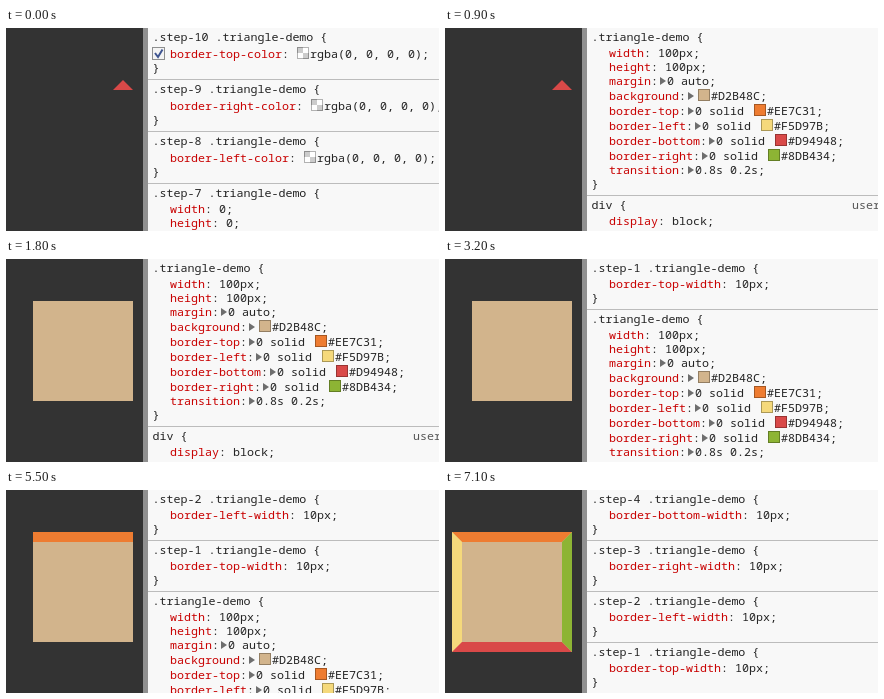
Write an HTML page that moves like this. It is 433x203 px and loops after 8 s.

```html
<!DOCTYPE html>
<html lang="en">
<head>
<meta charset="utf-8">
<title>CSS triangle demo</title>
<style>
  html, body { margin: 0; width: 100%; height: 100%; overflow: hidden; background: #333; }
  svg { display: block; width: 433px; height: 203px; overflow: hidden; }
  text { font: 11.667px "Noto Sans Mono", "DejaVu Sans Mono", monospace; fill: #222; white-space: pre; }
  .name { fill: #c80000; }
  .origin { fill: #555; }
</style>
</head>
<body>
<svg id="stage" viewBox="0 0 433 203">
  <rect width="137" height="203" fill="#333"/>
  <g id="box"></g>
  <rect x="137" width="5" height="203" fill="#909090"/>
  <rect x="142" width="291" height="203" fill="#f8f8f8"/>
</svg>
<script>
const LOOP = 8000, STEP = 100, CHAR = 7, ROW = 14;
const SELECTOR_X = 146.5, PROPERTY_X = 164;
const stage = document.getElementById('stage');

function add(parent, tag, attrs, content) {
  const node = document.createElementNS('http://www.w3.org/2000/svg', tag);
  for (const key in attrs) node.setAttribute(key, attrs[key]);
  if (content) node.textContent = content;
  parent.appendChild(node);
  return node;
}

// Style rules shown in the inspector
const COLORS = { top: '#EE7C31', left: '#F5D97B', bottom: '#D94948', right: '#8DB434' };
const stepRule = (n, ...props) => ({ selector: `.step-${n} .triangle-demo`, props });
const clearSide = (n, side) => stepRule(n, [`border-${side}-color`, 'rgba(0, 0, 0, 0)']);
const growSide = (n, side) => stepRule(n, [`border-${side}-width`, '10px']);

const base = {
  selector: '.triangle-demo',
  props: [
    ['width', '100px'], ['height', '100px'], ['margin', '0 auto'], ['background', '#D2B48C'],
    ...Object.entries(COLORS).map(([side, color]) => [`border-${side}`, `0 solid ${color}`]),
    ['transition', '0.8s 0.2s']
  ]
};
const division = { selector: 'div', origin: 'user agent stylesheet', props: [['display', 'block']] };
const step1 = growSide(1, 'top'), step2 = growSide(2, 'left');
const step3 = growSide(3, 'right'), step4 = growSide(4, 'bottom');

const panels = [
  [0, [clearSide(10, 'top'), clearSide(9, 'right'), clearSide(8, 'left'),
       stepRule(7, ['width', '0'], ['height', '0'])]],
  [900, [base, division]],
  [3200, [step1, base]],
  [5500, [step2, step1, base]],
  [6000, [step3, step2, step1, base]],
  [6400, [step4, step3, step2, step1]]
].map(([start, rules]) => ({ start, node: drawPanel(rules) }));

function drawSwatch(g, x, y, color) {
  const clear = color.startsWith('rgba');
  add(g, 'rect', { x, y, width: 12, height: 12, fill: clear ? '#fff' : color });
  if (clear) add(g, 'path', { d: `M${x} ${y}h6v12h6v-6h-12z`, fill: '#ccc' });
  add(g, 'rect', { x: x + .5, y: y + .5, width: 11, height: 11, fill: 'none', stroke: '#000', 'stroke-opacity': .3 });
}

function drawProperty(g, name, prefix, color, y) {
  const shorthand = /^(margin|background|transition|border-\w+)$/.test(name);
  let x = PROPERTY_X;
  add(g, 'text', { x, y, class: 'name' }, name);
  x += name.length * CHAR;
  add(g, 'text', { x, y }, ':');
  x += CHAR;
  if (shorthand) add(g, 'path', { d: `M${x + 2} ${y - 8}l6 4l-6 4z`, fill: '#6e6e6e' });
  x += shorthand ? 9 : CHAR;
  if (prefix) add(g, 'text', { x, y }, color ? prefix : prefix + ';');
  if (color) {
    x += prefix.length * CHAR + (shorthand ? 3 : 1);
    drawSwatch(g, x, y - 11, color);
    add(g, 'text', { x: x + 13, y }, color + ';');
  }
}

function drawPanel(rules) {
  const g = add(stage, 'g', {});
  let top = 0;
  for (const { selector, origin, props } of rules) {
    let y = top + 13;
    if (top) add(g, 'rect', { x: 142, y: top - 1, width: 291, height: 1, fill: '#bcbcbc' });
    add(g, 'text', { x: SELECTOR_X, y }, selector + ' {');
    if (origin) add(g, 'text', { x: 407, y, class: 'origin' }, origin);
    y += 2;
    for (const [name, value] of props) {
      const [, prefix, color] = value.match(/^(.*?)((?:#|rgba).*)?$/);
      y += color ? ROW + 1 : ROW; // a swatch makes its line taller
      drawProperty(g, name, prefix, color, y);
    }
    y += ROW;
    add(g, 'text', { x: SELECTOR_X, y }, '}');
    top = y + 8;
  }
  return g;
}

const checkbox = add(stage, 'g', {});
add(checkbox, 'rect', { x: 146.5, y: 19.5, width: 12, height: 12, fill: '#f4f4f4', stroke: '#8e8f8f' });
add(checkbox, 'path', { d: 'M149 25l3 4l4.5-7.5', fill: 'none', stroke: '#3f5590', 'stroke-width': 2 });

// Demo box
const box = document.getElementById('box');
const fill = add(box, 'rect', { fill: '#D2B48C' });
const sides = {};
for (const side in COLORS) sides[side] = add(box, 'polygon', { fill: COLORS[side] });

// cubic-bezier(.25, .1, .25, 1) over 800 ms
function ease(time, start) {
  const p = Math.min(1, Math.max(0, (time - start) / 800));
  if (p === 0 || p === 1) return p;
  const bezier = (u, a, b) => 3 * u * (1 - u) * ((1 - u) * a + u * b) + u ** 3;
  let lo = 0, hi = 1;
  for (let i = 0; i < 24; i++) {
    const mid = (lo + hi) / 2;
    if (bezier(mid, .25, .25) < p) lo = mid; else hi = mid;
  }
  return bezier(lo, .1, 1);
}

function drawBox(time) {
  const reset = ease(time, 1000);
  const size = Math.round(100 * reset);
  const border = start => Math.round(10 * (1 - reset + ease(time, start)));
  const t = border(3250), l = border(5550), r = border(6024), b = border(6450);
  const x1 = 127, y0 = 42, x0 = x1 - l - size - r, y1 = y0 + t + size + b;
  const ix0 = x0 + l, ix1 = x1 - r, iy0 = y0 + t, iy1 = y1 - b;
  const shapes = {
    top: [x0, y0, x1, y0, ix1, iy0, ix0, iy0],
    left: [x0, y0, ix0, iy0, ix0, iy1, x0, y1],
    bottom: [x0, y1, ix0, iy1, ix1, iy1, x1, y1],
    right: [x1, y0, x1, y1, ix1, iy1, ix1, iy0]
  };
  for (const side in shapes) {
    sides[side].setAttribute('points', shapes[side].join(' '));
    sides[side].setAttribute('opacity', side === 'bottom' ? 1 : reset);
  }
  const rect = { x: x0, y: y0, width: x1 - x0, height: y1 - y0, opacity: reset };
  for (const key in rect) fill.setAttribute(key, rect[key]);
}

function render(now) {
  const time = Math.floor(now % LOOP / STEP) * STEP;
  drawBox(time);
  const current = panels.filter(p => p.start <= time).pop();
  for (const p of panels) p.node.style.display = p === current ? '' : 'none';
  checkbox.style.display = time < 100 ? '' : 'none';
}

let origin;
function frame(now) {
  origin ??= now;
  render(now - origin);
  requestAnimationFrame(frame);
}
render(0);
requestAnimationFrame(frame);
</script>
</body>
</html>
```
